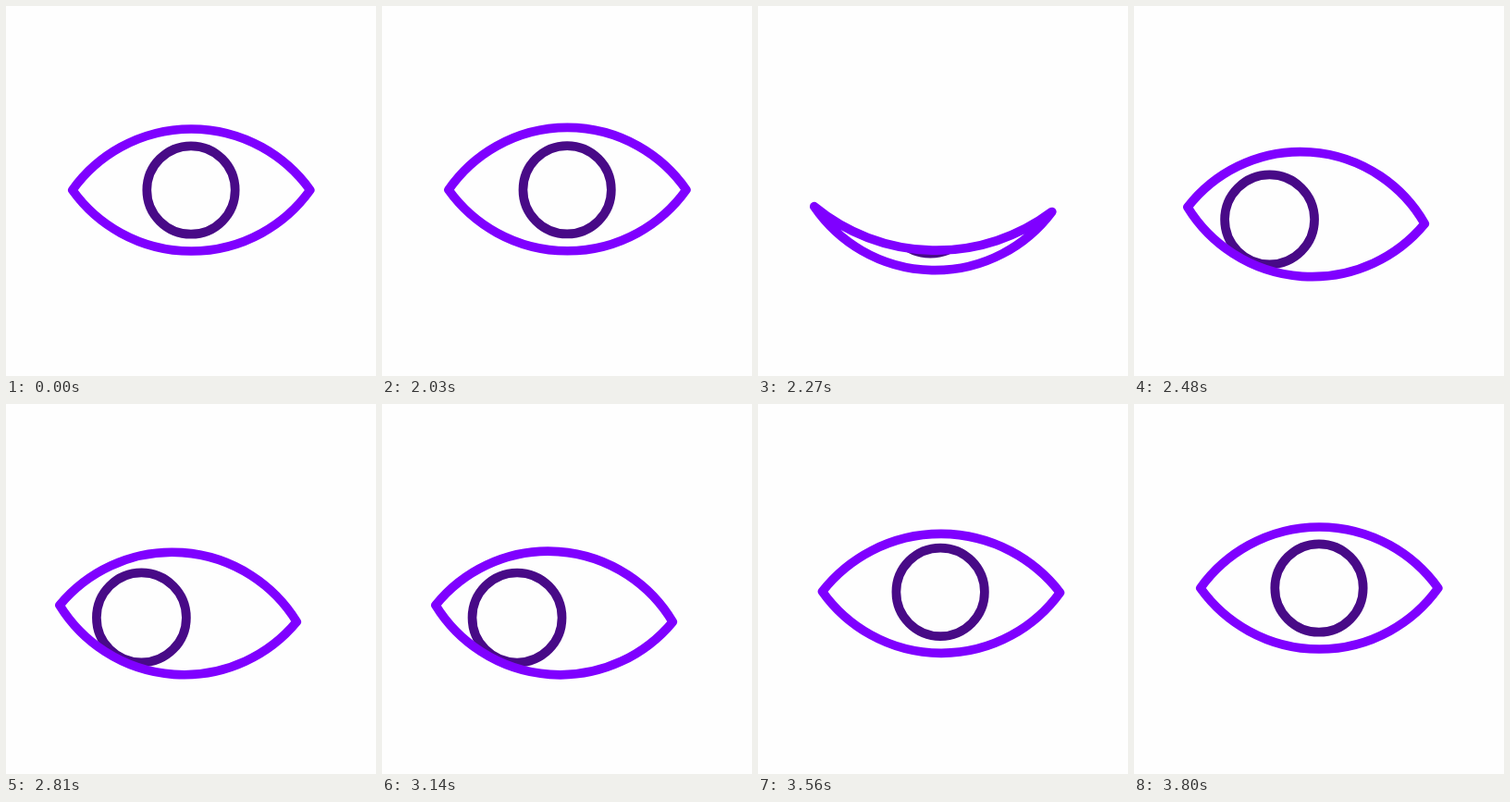
An HTML page for the animation above (3.89 s loop, 400 by 400 pixels).

```html
<!DOCTYPE html>
<html lang="en">
<head>
<meta charset="utf-8">
<title>Blinking eye</title>
<style>
  html, body { margin: 0; width: 100%; height: 100%; overflow: hidden; background: #fefefe; }
  svg { display: block; width: 100vw; height: 100vh; }
  .line { fill: none; stroke-width: 9.7; stroke-linejoin: round; }
  #lids { stroke: #7f00ff; }
  #iris { stroke: #480a87; }
</style>
</head>
<body>
<svg viewBox="0 0 400 400">
  <clipPath id="opening"><path id="mask"/></clipPath>
  <g clip-path="url(#opening)"><circle id="iris" class="line"/></g>
  <path id="lids" class="line"/>
</svg>
<script>
  const LOOP = 3890, START = 2030, STEP = 30;
  const HALF = 128.5, SAG = 66, BACK = 1.15;

  // x, y, tilt: whole eye; lid: height of the upper lid; lookX, lookY, r: iris
  const home = { x: 200.3, y: 199, tilt: 0, lid: SAG, lookX: -.3, lookY: 0, r: 47.7 };
  const shut = { x: 188, y: 222, tilt: 1.4, lid: -57, lookX: -3.2, lookY: 0, r: 48 };
  const away = { x: 186.1, y: 226.5, tilt: 4, lid: SAG, lookX: -39.7, lookY: 4.4, r: 48.5 };

  const moves = [
    { from: home, to: shut, start: 2000, end: 2277 },
    { from: shut, to: away, start: 2277, end: 2520 },
    { from: away, to: shut, start: 3110, end: 3410 },
    { from: shut, to: home, start: 3410, end: 3760 }
  ];

  const backIn = (u, k) => u * u * ((k + 1) * u - k);
  const backOut = (u, k) => 1 - backIn(1 - u, k);

  // Closing winds up every part; opening lets only the lid overshoot
  function ease(move, part, u) {
    if (move.to === shut) return backIn(u, BACK);
    return backOut(u, part === "lid" ? BACK : 0);
  }

  function poseAt(t) {
    if (t < START) return home;
    const move = moves.findLast(m => t >= m.start);
    const u = Math.min(1, (t - move.start) / (move.end - move.start));
    const pose = {};
    for (const part in home) {
      const a = move.from[part], b = move.to[part];
      pose[part] = a + (b - a) * ease(move, part, u);
    }
    return pose;
  }

  function arc(sag, toX) {
    if (Math.abs(sag) < .05) return `L${toX} 0`;
    const r = (HALF * HALF + sag * sag) / (2 * Math.abs(sag));
    return `A${r} ${r} 0 0 ${sag > 0 ? 1 : 0} ${toX} 0`;
  }

  const [mask, iris, lids] = ["mask", "iris", "lids"].map(id => document.getElementById(id));

  function draw({ x, y, tilt, lid, lookX, lookY, r }) {
    for (const shape of [mask, lids]) {
      shape.setAttribute("d", `M${-HALF} 0${arc(lid, HALF)}${arc(SAG, -HALF)}Z`);
      shape.setAttribute("transform", `translate(${x} ${y}) rotate(${tilt})`);
    }
    iris.setAttribute("cx", x + lookX);
    iris.setAttribute("cy", y + lookY);
    iris.setAttribute("r", r);
  }

  const begin = performance.now();

  function tick() {
    const t = Math.max(0, performance.now() - begin) % LOOP;
    draw(poseAt(START + Math.floor((t - START) / STEP) * STEP));
    requestAnimationFrame(tick);
  }
  tick();
</script>
</body>
</html>
```
